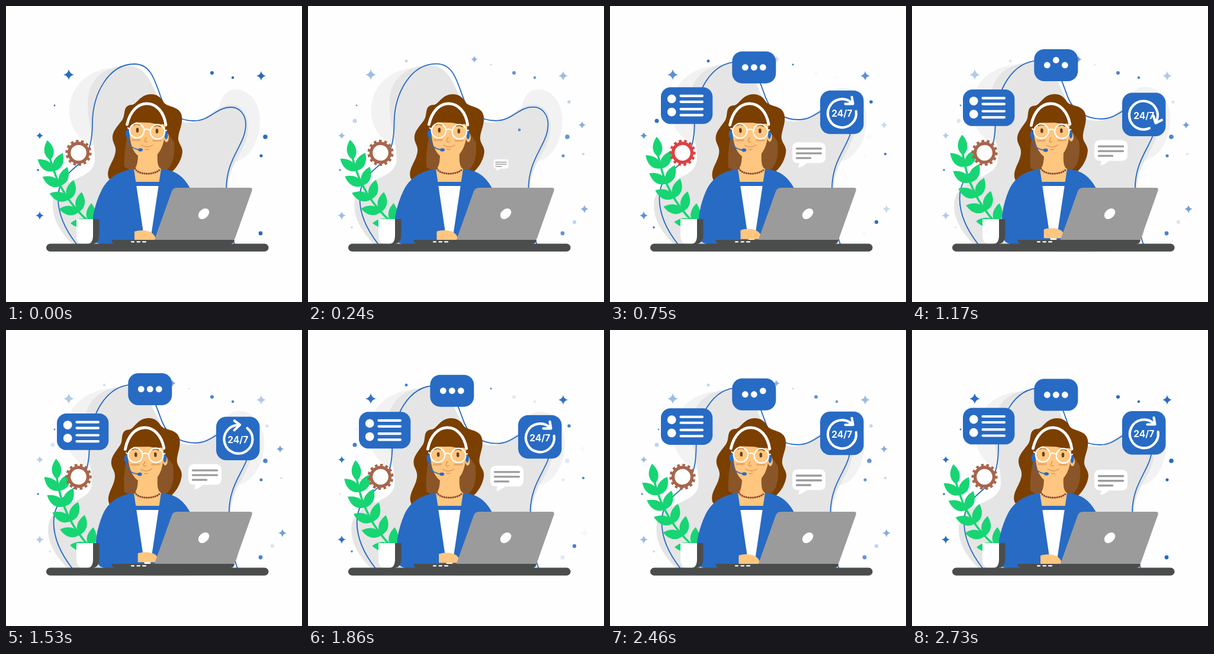
Recreate the animation shown at these times as an HTML page. Size 500 by 500 pixels, loop 2.76 s.

```html
<!DOCTYPE html>
<html lang="en">
<head>
<meta charset="utf-8">
<title>Support desk</title>
<style>
html, body { margin: 0; width: 100%; height: 100%; overflow: hidden; background: #fefefe; }
svg { display: block; width: 100vw; height: 100vh; }
.blue { fill: #286bc4; }
.skin { fill: #ffc67f; }
.hair { fill: #7b3f00; }
.dark { fill: #4b4d4c; }
.white { fill: #fff; }
.line { fill: none; stroke-linecap: round; stroke-linejoin: round; }
text { font: 700 15.5px Inter, sans-serif; fill: #fff; text-anchor: middle; }
</style>
</head>
<body>
<svg viewBox="0 0 500 500">
  <g id="backdrop">
    <g fill="#f2f2f2">
      <path d="M140 234C118 220 107 200 107 177C107 140 135 104 190 104V234Z"/>
      <path d="M360 190C357 160 370 141 388 141C412 141 429 165 429 192C429 235 405 263 383 263Z"/>
    </g>
    <path fill="#e5e5e5" d="M112 402C92 382 79 360 79 338C79 285 150 300 150 258C150 230 138 200 138 165C138 125 165 101 205 101C262 101 245 197 310 197C340 197 350 167 382 167C398 167 409 182 409 205C409 245 375 262 375 310C375 345 390 350 386 385Q380 404 340 412Q260 416 200 411Z"/>
    <path class="line" stroke="#286bc4" stroke-width="1.8" d="M119 402C98 375 88 350 88 325C88 292 107 282 125 265S146 222 146 195C147 150 172 98 217 98C247 98 252 130 264 160C272 180 292 194 317 194C345 194 355 171 380 171C395 171 405 184 405 200C405 235 372 255 372 310Q374 370 386 402"/>
  </g>
  <g id="sparkles" class="blue"></g>

  <g id="plant" fill="#17d573">
    <path class="line" stroke="#17d573" stroke-width="3.6" d="M74.400 257.600Q91.400 323.800 143 367"/>
  </g>
  <g id="gear">
    <circle r="16" fill="#fff" stroke-width="5.400"/>
    <circle r="20" fill="none" stroke-width="4.200" pathLength="28" stroke-dasharray="1"/>
  </g>

  <g class="head">
    <path class="hair" d="M245 149C226 149 221 167 212 167C196 168 203 184 196 193C186 206 179 213 180 224C181 234 189 238 183 254C179 266 168 278 174 292Q190 300 210 296L262 290C284 284 297 262 298 246C298 236 290 232 291 222C292 210 299 200 297 186C294 168 272 172 266 162C261 153 254 149 245 149Z"/>
    <path fill="#8a5528" d="M207 210C202 230 199 250 200 272Q230 290 262 282C284 275 285 250 284 230L270 210Z"/>
  </g>
  <path class="skin" d="M223 248H256C255 266 257 274 264 276L258 299H219L215 276C221 274 223 264 223 248Z"/>
  <path class="line" d="M218 275C224 286 253 286 261 275" stroke="#8b4a33" stroke-width="3.4" stroke-dasharray="0 3.7"/>
  <path class="white" d="M219 302H259L243 398H234Z"/>
  <path class="blue" d="M217 297H260L259 304H219Z"/>
  <path class="blue" d="M262 275C282 277 298 284 311 308L300 402H243Z"/>
  <path class="blue" d="M216 275C200 278 190 284 185 292V403H235Z"/>
  <path id="sleeve" class="blue" d="M216 275C190 279 172 290 161 312C150 335 145 357 145 382C145 399 153 403 170 403H215V290Z"/>
  <path id="hand" class="skin" d="M217 381C225 378 239 378 246 383C251 387 253 391 253 396H217Z"/>

  <g class="head">
    <ellipse class="skin" cx="271" cy="222" rx="4" ry="8"/>
    <ellipse class="blue" cx="206" cy="216" rx="4" ry="7.500"/>
    <ellipse class="blue" cx="270.500" cy="218" rx="3" ry="7"/>
    <path class="skin" d="M209 196C206 235 217 258 238 258C260 258 270 232 269 198Z"/>
    <path class="hair" d="M203 210C203 180 219 164 238 164C257 164 271 180 272 209C270 201 266 198 261 200C248 199 236 196 229 189C222 195 212 199 208 208Z"/>
    <path class="line" stroke="#fff" stroke-width="4.800" d="M204.500 200C210 176 224 164.800 238 164.800C254 164.800 267 179 270 201"/>
    <path class="line" stroke="#7b3f00" stroke-width="1.500" d="M216 201Q221 198 226 201M251 203Q256 200 261 204"/>
    <path class="line" stroke="#e8a968" stroke-width="3.600" d="M214 226.500H226M249 227.500H261"/>
    <path class="line" stroke="#d8934f" stroke-width="1.300" d="M237 222L234 228Q236 231 239 229M229 235Q239 241 248 235M235 242Q238 243 241 242"/>
    <path class="line" stroke="#68401f" stroke-width="4.400" d="M222 208V211.500M255 209.500V213"/>
    <g class="line" stroke="#fff" stroke-width="2.200">
      <circle cx="221" cy="210.500" r="12.200"/>
      <circle cx="256" cy="212.500" r="12.200"/>
      <path d="M233 209.500Q238 206 244 210.500M209 208L206 206M268 211L271 210"/>
    </g>
    <path class="line" stroke="#286bc4" stroke-width="1.600" d="M205 220C206 236 213 241 226 243"/>
    <ellipse class="blue" cx="227" cy="243" rx="4" ry="2.800"/>
  </g>

  <path class="dark" d="M147 360H157.500V387Q157 401 146 402H138Z"/>
  <path class="white" d="M119 360H147V387Q147 402 137 402H131Q119 402 119 387Z"/>
  <rect class="dark" x="68" y="401.500" width="375.500" height="13.300" rx="6.650"/>
  <path fill="#9b9b9b" d="M289 307H412Q417 307 415.500 312L387 392Q385 397 380 397H250L280 313Q282 307 289 307Z"/>
  <path class="dark" d="M178 395H386Q385 402 379 402H185Q179 401 178 395Z"/>
  <path class="line" stroke="#fff" stroke-width="2.200" d="M212 398.300H216M221.500 398.300H226M231 398.300H236"/>
  <ellipse class="white" rx="10.500" ry="7.500" transform="translate(334 351) rotate(-42)"/>

  <g id="chat">
    <path class="white" d="M318 236H354Q364 236 364 246V261Q364 271 354 271H333Q326 277 318 279L320 271H318Q308 271 308 261V246Q308 236 318 236Z"/>
    <path class="line" stroke="#9b9b9b" stroke-width="3.400" d="M315.500 246.700H356.500M315.500 254.700H356.500M315.500 262.700H338.500"/>
  </g>
  <g id="clock">
    <rect class="blue" x="355" y="137" width="73.500" height="73.500" rx="17"/>
    <path id="arrow" class="line" stroke="#fff" stroke-width="4.200" d="M415.700 172A24 24 0 1 1 408.500 158M397.500 159.500H410.500L408.500 148"/>
    <text x="391.700" y="181">24/7</text>
  </g>
  <g id="list">
    <rect class="blue" x="86" y="131.500" width="87.300" height="61.800" rx="16"/>
    <circle class="white" cx="104.200" cy="151" r="7.400"/>
    <circle class="white" cx="104.200" cy="173.200" r="7.400"/>
    <path class="line" stroke="#fff" stroke-width="4.200" d="M119.500 146H156M119.500 156H156M119.500 168.200H156M119.500 178.500H156"/>
  </g>
  <g id="typing">
    <rect class="blue" x="206.300" y="82.500" width="74" height="54" rx="17"/>
    <g id="typingDots" class="white"></g>
  </g>
</svg>

<script>
const LOOP = 2760, STEP = 30, CYCLE = 2700;
const get = id => document.getElementById(id);
const set = (el, attrs) => { for (const k in attrs) el.setAttribute(k, attrs[k]); return el; };
const add = (parent, tag, attrs) =>
  parent.appendChild(set(document.createElementNS("http://www.w3.org/2000/svg", tag), attrs));
const clamp = v => Math.min(1, Math.max(0, v));
const wave = (t, period) => (1 - Math.cos(2 * Math.PI * t / period)) / 2;
const ease = (t, start, duration) => wave(clamp((t - start) / duration), 2);
const pulse = (t, peak, halfWidth) => 1 - wave(clamp(Math.abs(t - peak) / halfWidth), 2);
const pivot = (x, y, change) => `translate(${x} ${y}) ${change} translate(${-x} ${-y})`;

// Leaves sit in pairs along the stem and flatten out towards its base.
function addLeaf(i, angle) {
  const x = 81 + 9.5 * i + 1.5 * i * i, y = 279 + 26 * i - i * i;
  add(get("plant"), "path", {
    d: "M0 0C9-11 22-10 34 0C22 10 9 11 0 0Z",
    transform: `translate(${x} ${y}) rotate(${angle})`,
  });
}
addLeaf(-.7, -99);
for (let i = 0; i < 5; i++) {
  addLeaf(i, 216 - 9 * i);
  addLeaf(i, -64 - 6 * i);
}

const star = (x, y, r) => ["path", {
  d: "M0-9Q1.5-1.5 9 0Q1.5 1.5 0 9Q-1.5 1.5-9 0Q-1.5-1.5 0-9Z",
  transform: `translate(${x} ${y}) scale(${r / 9})`,
}];
const dot = (cx, cy, r) => ["circle", { cx, cy, r }];

// Places run from the largest sparkle to the smallest.
function addSparkles(draw, size, shrink, places) {
  const group = add(get("sparkles"), "g", {});
  places.forEach(([x, y], i) => add(group, ...draw(x, y, size - shrink * i)));
  return group;
}
const starsA = addSparkles(star, 9, 1, [[106, 116], [431, 118], [57, 354], [57, 219]]);
const starsB = addSparkles(star, 6.9, .6, [[467, 343], [463, 201], [281, 90]]);
const dotsA = addSparkles(dot, 3.8, .4,
  [[438, 221], [430, 384], [348, 113], [431, 253], [383, 121], [54, 277], [82, 168]]);
const dotsB = addSparkles(dot, 3.5, .35,
  [[79, 194], [450, 365], [441, 162], [166, 93], [465, 250], [74, 374], [309, 99]]);

const typingDots = [-1, 0, 1].map(i =>
  add(get("typingDots"), "circle", { cx: 243.3 + 15 * i, r: 5.4 }));

// Bubbles grow from an anchor point and drift vertically.
const bubbles = [
  { id: "chat", x: 318, y: 279, start: 100, drift: -10 },
  { id: "clock", x: 355, y: 210.5, start: 195, drift: 10 },
  { id: "list", x: 173.3, y: 193.3, start: 230, drift: 10 },
  { id: "typing", x: 243.3, y: 136.5, start: 245, drift: -10 },
];

function render(t) {
  const sway = wave(t, CYCLE);
  set(get("backdrop"), { transform: pivot(262, 330, `scale(${1 + .045 * sway} ${1 + .025 * sway})`) });
  set(get("plant"), { transform: pivot(140, 361, `rotate(${6.8 * sway}) scale(${1 + .015 * sway})`) });
  document.querySelectorAll(".head").forEach(el =>
    set(el, { transform: `rotate(${-2.7 * sway} 240 270)` }));
  set(get("sleeve"), { transform: pivot(0, 275, `matrix(1 0 ${.065 * sway} 1 0 0)`) });
  set(get("hand"), { transform: `translate(${6 * sway} ${-4 * sway})` });

  const starGlow = wave(t, CYCLE / 3), dotGlow = wave(t, CYCLE / 2);
  set(starsA, { opacity: 1 - starGlow });
  set(starsB, { opacity: starGlow });
  set(dotsA, { opacity: 1 - dotGlow });
  set(dotsB, { opacity: dotGlow });

  const flush = pulse(t, 750, 180);
  set(get("gear"), {
    stroke: `rgb(${168 + 53 * flush} ${101 - 36 * flush} ${76 - 11 * flush})`,
    transform: `translate(122.5 248) rotate(${360 * t / LOOP})`,
  });

  for (const { id, x, y, start, drift } of bubbles) {
    const size = ease(t, start, 300);
    set(get(id), {
      visibility: size > 0 ? "visible" : "hidden",
      transform: `translate(0 ${drift * sway}) ` + pivot(x, y, `scale(${size})`),
    });
  }
  set(get("arrow"), { transform: `rotate(${360 * ease(t, 945, 755)} 391.7 174.5)` });
  typingDots.forEach((el, i) => {
    const peak = 990 + 180 * i;
    set(el, { cy: 109.5 - 8.5 * (pulse(t, peak, 160) + pulse(t, peak + 1050, 160)) });
  });
}

const begin = performance.now();
function tick() {
  const t = (performance.now() - begin) % LOOP;
  render(Math.floor(t / STEP) * STEP);
  requestAnimationFrame(tick);
}
tick();
</script>
</body>
</html>
```
